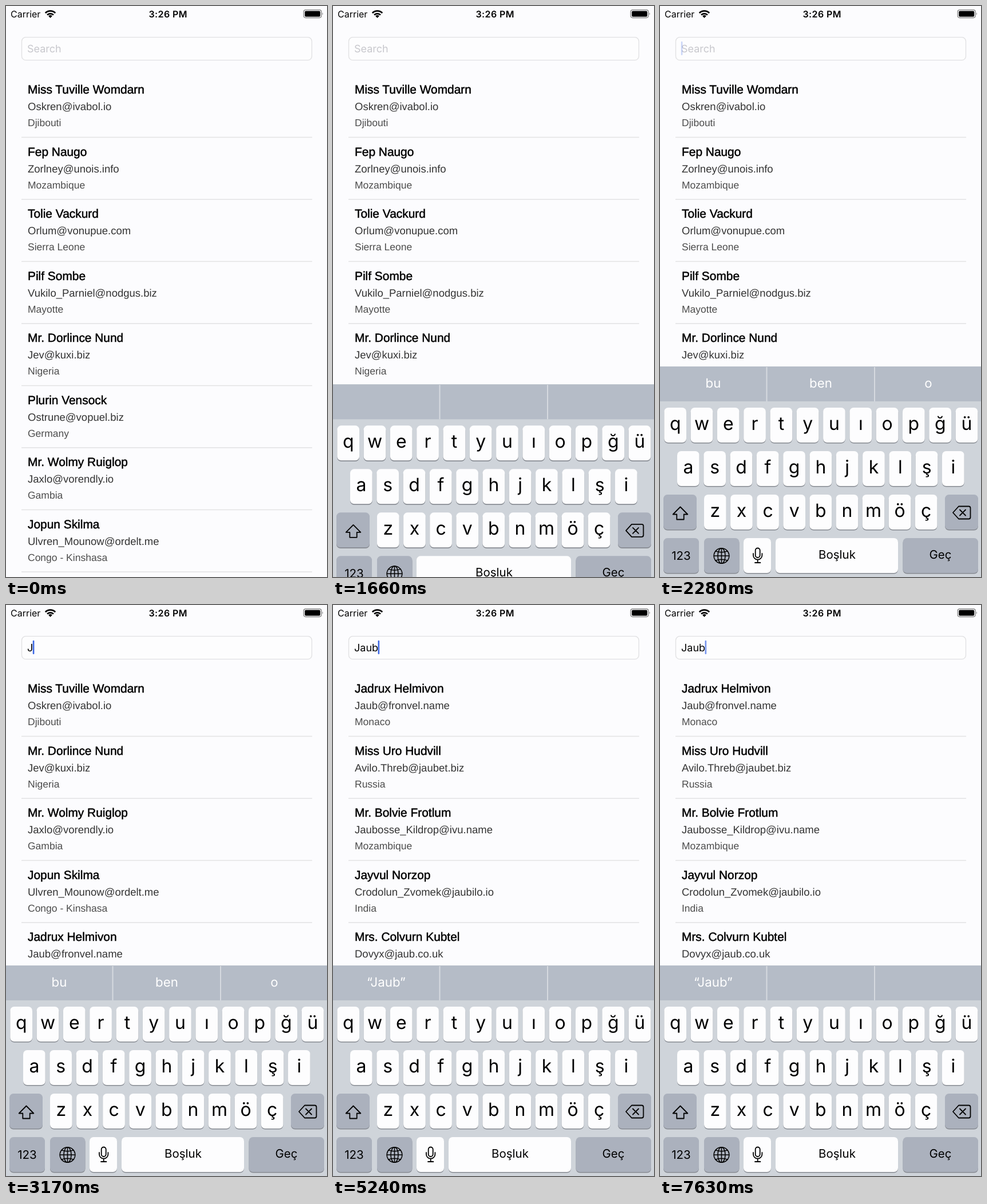
Animation, 561 px wide and 998 px high, one loop 7.68 s. Source, as an HTML page:

```html
<!DOCTYPE html>
<html lang="en">
<head>
<meta charset="utf-8">
<title>Contact search</title>
<style>
  html, body { margin: 0; width: 100%; height: 100%; overflow: hidden; background: #fcfcfe; }
  svg { display: block; font-family: Inter, "Open Sans", sans-serif; text-rendering: geometricPrecision; }
  #list { font-family: "Liberation Sans", Arial, sans-serif; }
  .name { font-size: 20.9px; stroke: #000; stroke-width: .5px; }
  .mail { font-size: 18.5px; fill: #333; }
  .country { font-size: 17.5px; fill: #4c4c4c; }
  .status { font-size: 16px; }
  .letter { font-size: 32px; font-weight: 400; }
  .label { font-size: 20.5px; }
  .hint { font-size: 22.3px; fill: #fff; }
  .middle { text-anchor: middle; }
  .icon { fill: none; stroke: #000; stroke-width: 1.8; stroke-linejoin: round; stroke-linecap: round; }
</style>
</head>
<body>
<svg width="561" height="998" viewBox="0 0 561 998">
  <rect width="561" height="998" fill="#fcfcfe"/>
  <text class="status" x="8" y="20">Carrier</text>
  <g fill="none" stroke="#000" stroke-width="2.7">
    <path d="M68.8 12.2a12.2 12.2 0 0 1 17.4 0M72 15.6a7.8 7.8 0 0 1 11 0"/>
    <path d="M77.5 21l-3.3-3.5a4.6 4.6 0 0 1 6.6 0z" fill="#000" stroke="none"/>
  </g>
  <text class="status middle" x="283.2" y="20" font-weight="600" letter-spacing=".4">3:26 PM</text>
  <rect x="520.2" y="6.8" width="31" height="13.8" rx="3.5" fill="none" stroke="#777" stroke-width="1.2"/>
  <rect x="522.2" y="8.7" width="27" height="10" rx="1.8"/>
  <path d="M552.8 11.3q2 2.4 0 4.8z" fill="#777"/>

  <rect x="27.5" y="54.7" width="507" height="40" rx="7" fill="#fdfdfe" stroke="#e0e0e2" stroke-width="1.3"/>
  <text id="query" x="37" y="80.5" font-size="18"></text>
  <rect id="caret" y="62" width="2.6" height="24" rx="1" fill="#3d68e4"/>
  <g id="list"></g>

  <g id="keyboard">
    <rect y="630" width="561" height="368" fill="#cfd4da"/>
    <rect y="630" width="561" height="61" fill="#b5bcc7"/>
    <path d="M186.5 631v60M375 631v60" stroke="#d6dae0" stroke-width="2"/>
    <g id="hints"></g>
    <g id="keys"></g>
    <g class="icon">
      <path d="M35.5 875.5L22.7 888.5H29.3V897.5H41.7V888.5H48.3Z"/>
      <path d="M522 874.5H539.5q3 0 3 3V893.5q0 3-3 3H522L512 885.5ZM524 880.5l10 10m0-10l-10 10"/>
      <g stroke-width="1.5">
        <circle cx="107.5" cy="961" r="13.3"/>
        <ellipse cx="107.5" cy="961" rx="6.5" ry="13.3"/>
        <path d="M107.5 947.7v26.6M94.2 961h26.6M97 952.8q10.5 4 21 0M97 969.2q10.5-4 21 0"/>
      </g>
    </g>
    <g id="spaceNarrow"></g>
    <g id="spaceWide"></g>
  </g>
</svg>
<script>
const LOOP = 7680, ROW = 108.5;
const $ = id => document.getElementById(id);

const people = `Miss Tuville Womdarn|Oskren@ivabol.io|Djibouti
Fep Naugo|Zorlney@unois.info|Mozambique
Tolie Vackurd|Orlum@vonupue.com|Sierra Leone
Pilf Sombe|Vukilo_Parniel@nodgus.biz|Mayotte
Mr. Dorlince Nund|Jev@kuxi.biz|Nigeria
Plurin Vensock|Ostrune@vopuel.biz|Germany
Mr. Wolmy Ruiglop|Jaxlo@vorendly.io|Gambia
Jopun Skilma|Ulvren_Mounow@ordelt.me|Congo - Kinshasa
Jadrux Helmivon|Jaub@fronvel.name|Monaco
Mrs. Vaulo Ploffer|Olejaudro.Nive@dolumb.tv|Somalia
Mrs. Condrive Ketlum|Jaulit.Witrul@olvit.biz|Svalbard and Bear Isle
Orejaudrin Konvolup|Byvum@dalmorn.us|Ghana
Clumo Jakuvontil|Jaudro_Veingil@odgurve.net|Nigeria
Miss Uro Hudvill|Avilo.Threb@jaubet.biz|Russia
Mr. Bolvie Frotlum|Jaubosse_Kildrop@ivu.name|Mozambique
Jayvul Norzop|Crodolun_Zvomek@jaubilo.io|India
Mrs. Colvurn Kubtel|Dovyx@jaub.co.uk|Ghana`.split("\n");

// Each entry takes effect at its time in ms.
const typed = [[0, ""], [3050, "J"], [3450, "Ja"], [3860, "Jau"], [4150, "Jaub"]];
const hints = [
  [0, ["", "", ""]], [1950, ["bu", "ben", "o"]],
  [3180, ["“J”", "Japon", "Japonya"]], [3580, ["“Ja”", "Japon", "Japonya"]],
  [4000, ["“Jau”", "", ""]], [4320, ["“Jaub”", "", ""]]
];
const valueAt = (steps, t) => steps.findLast(([start]) => t >= start)[1];

const text = (cls, x, y, s) => `<text class="${cls}" x="${x}" y="${y}">${s}</text>`;
const cap = (x, y, w, fill = "#fdfdfe") =>
  `<rect x="${x}" y="${y + 1.6}" width="${w}" height="61" rx="7" fill="#878b92"/>
   <rect x="${x}" y="${y}" width="${w}" height="61" rx="7" fill="${fill}"/>`;
const darkCap = (x, y, w) => cap(x, y, w, "#abb1bd");

function letterRow(letters, x0, y, pitch) {
  return [...letters].map((c, i) => {
    const x = x0 + i * pitch;
    return cap(x, y, 38.7) + text("letter middle", x + 19.4, y + 39, c);
  }).join("");
}

function buildKeyboard() {
  $("keys").innerHTML =
    letterRow("qwertyuıopğü", 7.3, 702, 46.3) +
    letterRow("asdfghjklşi", 30, 778, 46.3) +
    letterRow("zxcvbnmöç", 77, 854, 46.1) +
    darkCap(6, 854, 58) + darkCap(498, 854, 58) +
    darkCap(6, 930, 62) + text("label middle", 37, 967.5, "123") +
    darkCap(77, 930, 61.5) +
    darkCap(424.5, 930, 131.5) + text("label middle", 490, 966, "Geç");
  $("spaceNarrow").innerHTML =
    cap(146, 930, 48) + cap(202, 930, 214) + text("label middle", 309.5, 966, "Boşluk") +
    `<path class="icon" d="M166.7 951.5a4 4 0 0 1 8 0V960a4 4 0 0 1-8 0ZM163 957v3a7.7 7.7 0 0 0 15.4 0v-3M170.7 968v5M166 973h9.4"/>`;
  $("spaceWide").innerHTML = cap(146, 930, 270) + text("label middle", 281.5, 966, "Boşluk");
}

function showQuery(query) {
  const field = $("query");
  field.textContent = query || "Search";
  field.setAttribute("fill", query ? "#000" : "#c8c8cd");
  $("caret").setAttribute("x", query ? 36.5 + field.getComputedTextLength() : 36.8);
  $("list").innerHTML = people
    .filter(p => p.toLowerCase().includes(query.toLowerCase()))
    .slice(0, 8)
    .map((p, i) => {
      const [name, mail, country] = p.split("|"), y = i * ROW;
      return text("name", 38, 153 + y, name) + text("mail", 38, 182 + y, mail) +
        text("country", 38, 210 + y, country) +
        `<path d="M27 ${229.5 + y}H535" stroke="#e2e2e3" stroke-width="1.5"/>`;
    }).join("");
}

function showHints(words) {
  $("hints").innerHTML = words.map((w, i) => text("hint middle", 93 + 188 * i, 667, w)).join("");
}

// Critically damped spring from the hidden to the resting position.
function keyboardOffset(t) {
  const x = Math.max(0, t - 1437) * 0.01826;
  return 368 * (1 + x) * Math.exp(-x);
}

// Fade in, hold, fade out, hold; typing keeps the caret solid.
function caretOpacity(t) {
  if (t < 1700) return 0;
  if (t > 2750 && t < 4250) return 1;
  const phase = (t - (t < 3000 ? 1530 : 4020)) % 1010;
  return Math.max(0, Math.min(1, phase / 210, (850 - phase) / 380));
}

let shownQuery, shownHints;
function draw(now) {
  const t = now % LOOP, query = valueAt(typed, t), words = valueAt(hints, t);
  if (query !== shownQuery) showQuery(shownQuery = query);
  if (words !== shownHints) showHints(shownHints = words);
  const offset = keyboardOffset(t);
  $("keyboard").setAttribute("transform", `translate(0 ${offset < 0.5 ? 0 : offset})`);
  $("keyboard").setAttribute("visibility", t < 1437 ? "hidden" : "inherit");
  $("spaceWide").style.display = t < 1950 ? "" : "none";
  $("spaceNarrow").style.display = t < 1950 ? "none" : "";
  $("caret").setAttribute("opacity", caretOpacity(t));
}

buildKeyboard();
const start = performance.now();
function tick() {
  draw(performance.now() - start);
  requestAnimationFrame(tick);
}
tick();
</script>
</body>
</html>
```
